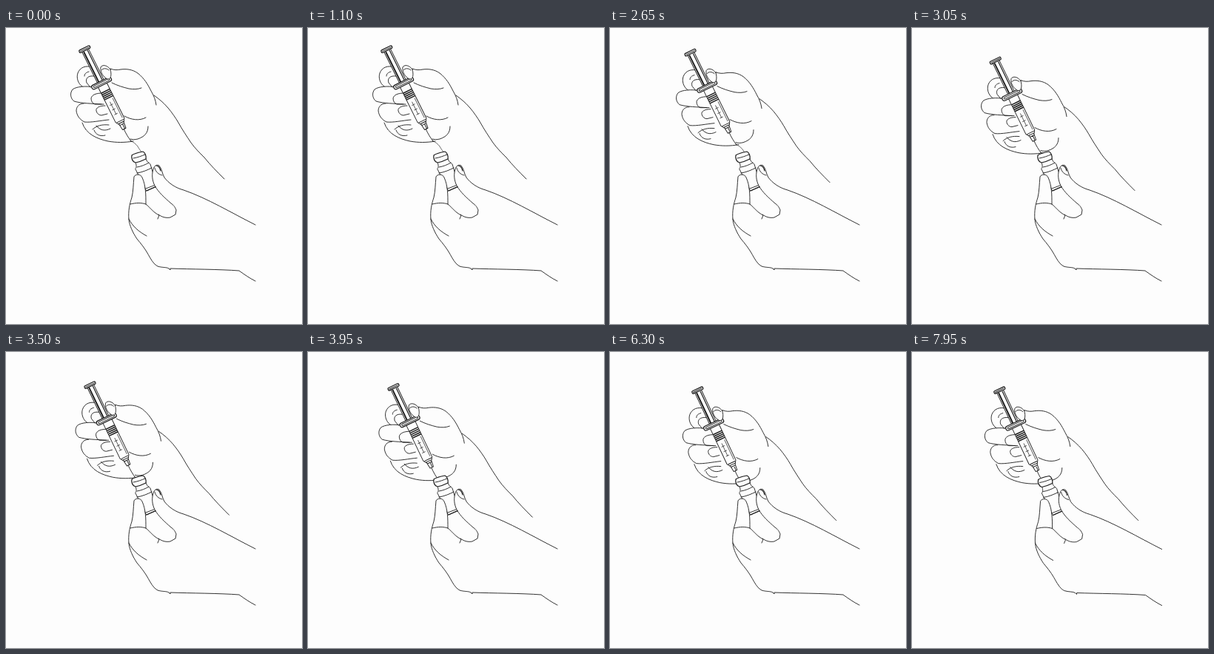
These frames come from a looping animation (400x400 px, 8000 ms). An HTML page without scripts:

```html
<!DOCTYPE html>
<html lang="en">
<head>
<meta charset="utf-8">
<title>Syringe and vial</title>
<style>
  html, body { margin: 0; width: 100%; height: 100%; overflow: hidden; background: #fdfdfd; }
  svg { display: block; width: 100%; height: 100%; }
  .ink { fill: none; stroke: #1c1c1c; stroke-width: .9; stroke-linecap: round; stroke-linejoin: round; }
  .paper { fill: #fdfdfd; }
  .bold { stroke-width: 1.2; }
  .thin { stroke-width: .65; }
</style>
</head>
<body>
<svg viewBox="0 0 400 400" role="img" aria-label="Hands drawing a dose from a vial">
  <g class="ink">
    <animateTransform attributeName="transform" type="translate" dur="8s" repeatCount="indefinite"
      keyTimes="0;.25;.281;.331;.344;.381;.45;.494;.556;1"
      values="0 0;0 0;.4 .2;2 4.6;2.8 6.8;6 15.6;6.6 16.4;8.3 19.2;10.8 23.6;10.8 23.6"/>
    <!-- palm and forearm -->
    <path d="M141 55C146 57 150 57 155 56C163 55 171 56 178 61C187 68 192 77 196 85C200 92 202 97 203 104"/>
    <path d="M200 91C207 96 213 101 219 108C224 114 229 121 233 128C238 137 244 146 250 155C255 162 261 168 268 175C276 185 285 194 295 204"/>
    <path d="M192 133C192 142 187 147 178 150C174 151 171 151 168 150M172 153C160 155 149 155 138 153C124 150 108 144 103 128"/>
    <path d="M160 119C169 124 180 126 189 121"/>
    <!-- index -->
    <path d="M103 79C97 75 95 67 97 61C100 53 108 50 117 53"/>
    <path d="M119 65C111 64 107 68 109 74L114 80M112 59C108 60 106 62 106 65"/>
    <!-- middle -->
    <path d="M119 80C108 78 95 79 90 83C86 88 87 95 92 99C102 102 116 102 129 103"/>
    <path d="M130 88C122 88 116 90 115 95C115 99 117 102 120 103L132 103"/>
    <!-- ring -->
    <path d="M105 102C98 102 95 107 95 112C96 119 100 124 106 127C115 128 128 125 139 124"/>
    <path d="M134 105C126 105 121 108 122 112C123 116 126 118 129 118L137 116"/>
    <!-- little -->
    <path d="M139 131C130 130 122 132 117 137M122 132C127 138 133 140 141 136M119 138C121 144 127 147 134 145"/>

    <g>
      <animateTransform attributeName="transform" type="rotate" dur="8s" repeatCount="indefinite"
        keyTimes="0;.28;.556;1" values="0 135 85;0 135 85;1.2 135 85;1.2 135 85"/>
      <path d="M159 136C162 143 166 149 169 153"/>
      <path class="thin" d="M168 152C172 154 176 157 178 160S181 166 184 168"/>
      <g transform="translate(106 28) rotate(-26.4)">
        <path class="paper" d="M-4.8 2V51H4.8V2"/>
        <path stroke-width="1.9" d="M-2.7 4V49"/>
        <path class="bold" d="M2.8 4V49"/>
        <rect class="paper bold" x="-8" y="-1.2" width="16" height="3.8" rx="1.4"/>
        <path d="M-6.5 .8H6.5"/>
        <path class="paper" d="M-6.6 54V108L-4 112H4L6.6 108V54Z"/>
        <path stroke-width="1.5" d="M-6 64H6M-6 66.5H6M-6 69H6M-6 71.5H6M-6 74H6"/>
        <path class="thin" d="M4.4 77V106M-1 80V98M-3 84H1M-3 91H1M-3 98H1"/>
        <path class="paper" d="M-3.6 111.5H3.6L2.5 121H-2.5Z"/>
        <path d="M-5 109H5M-3.2 114H3.2M.9 114V121"/>
        <rect class="paper bold" x="-14.5" y="49" width="29" height="6" rx="2.8"/>
        <rect x="-12" y="50.8" width="24" height="2.4" rx="1.2"/>
      </g>
    </g>

    <!-- thumb -->
    <path class="paper" d="M141 56C137 50 130 49 128 53C127 59 131 66 137 69C142 70 143 63 141 56Z"/>
    <path d="M129 57C131 54 136 54 139 57"/>
    <path d="M143 74C151 78 158 80 166 82C172 83 178 83 183 81"/>
  </g>

  <g class="ink">
    <animateTransform attributeName="transform" type="translate" calcMode="discrete" dur="8s"
      repeatCount="indefinite" keyTimes="0;.93" values="0 0;.6 .5"/>
    <!-- vial -->
    <path class="paper" d="M175 190C177 188 176 185 175 181L189 176C190 181 193 182 195 184L204 214L190 220Z"/>
    <path class="paper bold" d="M170 172C174 169 180 168 185 167C188 168 190 174 189 177C185 179 180 181 175 182C171 181 169 176 170 172Z"/>
    <path d="M172 176C178 175 183 173 188 171M177 188C183 187 188 185 193 182M177 196C184 195 191 192 197 189"/>
    <path class="bold" d="M190 220L203 214"/>
    <path d="M189 217L202 212"/>
    <!-- forefinger and palm -->
    <path class="paper" stroke="none" d="M173 200C176 197 182 198 184 202C188 213 189 225 189 238L206 252L230 247L210 224L197 220L189 222L189 260L167 260C165 240 172 222 173 200Z"/>
    <path d="M189 238C189 225 189 213 184 202C182 197 175 197 173 201C172 211 172 221 170 229C167 238 165 247 166 259C167 267 171 276 177 285C182 291 187 297 191 304C195 311 199 319 205 322C211 324 217 323 220 325L222 327L222 325C250 326 288 326 315 328C322 333 329 338 337 342"/>
    <path d="M168 238C176 236 183 236 189 238C195 243 200 250 207 253L205 258"/>
    <path d="M166 258C171 268 179 275 190 281"/>
    <!-- thumb and wrist -->
    <path class="paper" stroke="none" d="M199 191L205 185L215 203L235 218L230 250L221 256L206 252L225 238L201 213L197 200Z"/>
    <path d="M206 252C211 256 217 257 222 256L229 252L230 246C228 241 226 239 223 237C214 229 206 222 201 213C197 205 197 197 199 191C200 186 204 184 207 186C211 191 211 197 214 202C220 210 229 216 240 219C272 230 305 250 337 266"/>
    <path d="M201 189C202 194 206 198 211 199"/>
    <path class="bold" d="M203 186C206 186 208 189 209 193"/>
  </g>
</svg>
</body>
</html>
```
